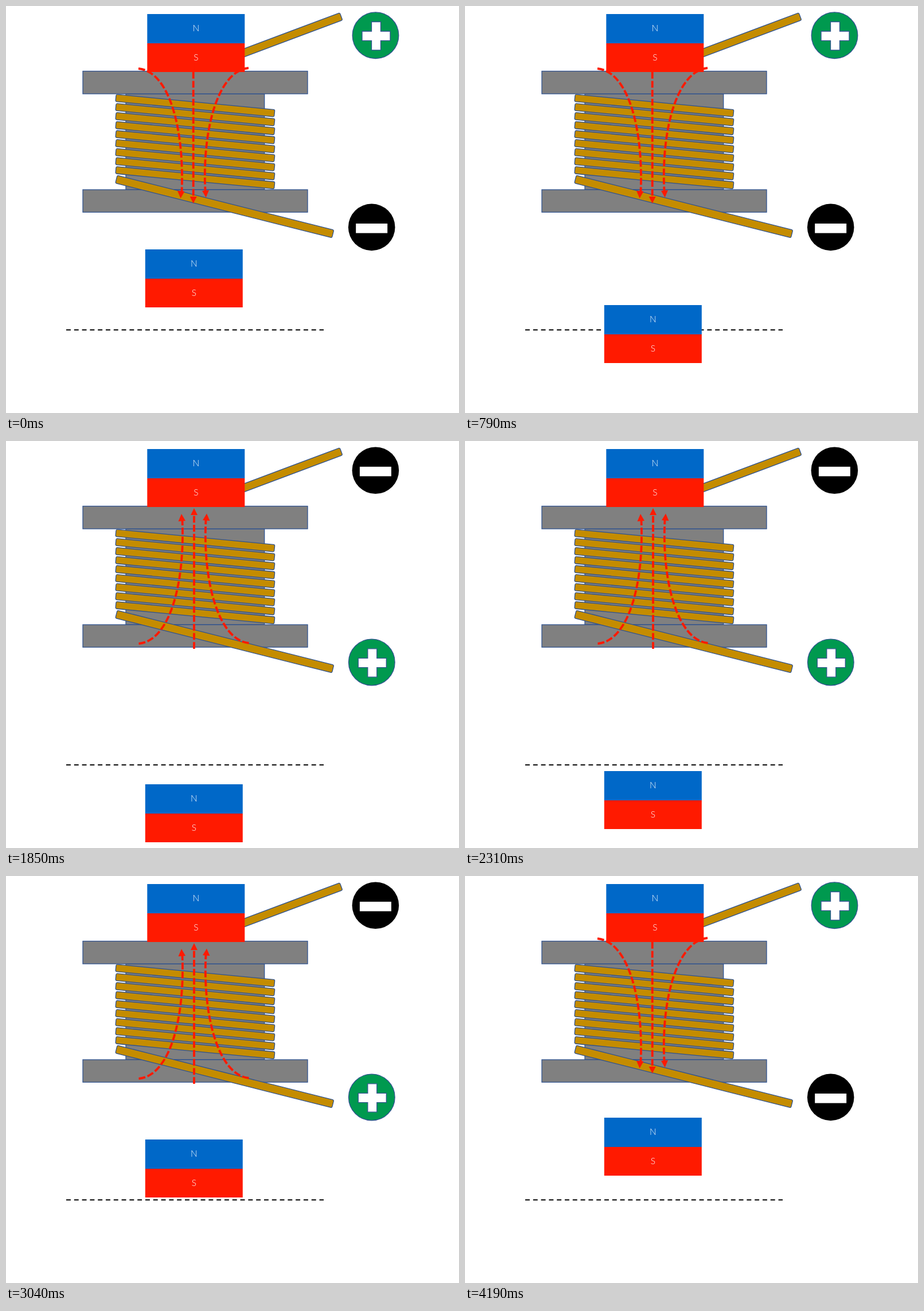
These frames come from a looping animation (790 by 709 pixels, 4220 ms). An HTML page:

```html
<!DOCTYPE html>
<html lang="en">
<head>
<meta charset="utf-8">
<title>Electromagnet and moving magnet</title>
<style>
  html, body { margin: 0; width: 100%; height: 100%; overflow: hidden; background: #fff; }
  svg { display: block; }
  text { font: 300 15.5px Lato, "Open Sans", sans-serif; fill: #fff; text-anchor: middle; }
  .edge { stroke: #2f528f; stroke-width: 1.3; }
  .iron { fill: #808080; }
  .wire { fill: #c48c00; }
  .field path { fill: none; stroke: #ff1a00; stroke-width: 3.9; stroke-dasharray: 11.8 3.9; }
  .field polygon { fill: #ff1a00; }
</style>
</head>
<body>
<svg width="790" height="709" viewBox="0 0 790 709">
  <defs>
    <g id="magnet">
      <rect width="170" height="51" fill="#0068c8"/>
      <rect y="51" width="170" height="50" fill="#ff1a00"/>
      <text x="85" y="30">N</text>
      <text x="85" y="81">S</text>
    </g>
    <g id="plus">
      <circle r="40.3" fill="#00994f" class="edge"/>
      <path d="M-7 -23.7h16v16.5h16.5v16.4h-16.5v16.5h-16v-16.5h-16.5v-16.4h16.5z" fill="#fff" class="edge"/>
    </g>
    <g id="minus">
      <circle r="40.8"/>
      <rect x="-27.5" y="-6.4" width="55" height="16.6" fill="#fff"/>
    </g>
  </defs>

  <g class="edge iron">
    <rect x="209" y="153" width="241.7" height="167"/>
    <rect x="134" y="113.5" width="392" height="39.5"/>
    <rect x="134" y="320" width="392" height="39.2"/>
  </g>
  <g id="coil" class="edge wire"></g>
  <use href="#magnet" x="246.3" y="14"/>

  <g id="down">
    <g class="field">
      <path d="M231 109C285 114 311 215 306.5 323"/>
      <path d="M326.7 99V333"/>
      <path d="M423 108C370 113 342 215 347.5 322"/>
      <polygon points="299,322 311.5,323 304.5,335"/>
      <polygon points="320.7,332 332.7,332 326.7,344"/>
      <polygon points="342,322 354,321 348.7,333.5"/>
    </g>
    <use href="#plus" x="644.5" y="51.2"/>
    <use href="#minus" x="637.7" y="385.4"/>
  </g>
  <g id="up">
    <g class="field">
      <path d="M231.5 353C286 348 312 247 307.5 139"/>
      <path d="M328 362V128"/>
      <path d="M423.5 352C371 347 343 245 348.5 138"/>
      <polygon points="300.5,140 313,139 306,127"/>
      <polygon points="322,129 334,129 328,117"/>
      <polygon points="343,138 355.5,139 350,126.5"/>
    </g>
    <use href="#minus" x="644.4" y="51.2"/>
    <use href="#plus" x="637.8" y="385.5"/>
  </g>

  <path d="M105 564.2H554" stroke="#000" stroke-width="2" stroke-dasharray="7.9 5.9"/>
  <use id="mover" href="#magnet" x="242.8"/>
</svg>
<script>
  const LOOP = 4220, TRAVEL = 1760, TOP = 421, BOTTOM = 598;
  const FALL_START = -148, RISE_START = 1858;
  const FLIP = 1270, FLIP_BACK = 3270;
  const el = id => document.getElementById(id);

  const bar = (x, y, length, width, angle) =>
    `<rect y="${-width / 2}" width="${length}" height="${width}" rx="2.3"
      transform="translate(${x} ${y}) rotate(${angle})"/>`;

  let bars = bar(584.5, 18.2, 230, 13.6, 159.5);
  for (let i = 0; i < 9; i++) bars += bar(191.5, 160.2 + i * 15.7, 278, 12.5, 5.5);
  el("coil").innerHTML = bars + bar(192.4, 301.8, 389.5, 14, 14.15);

  // Constant acceleration to the midpoint, then constant braking
  function ease(u) {
    u = Math.min(1, Math.max(0, u));
    return u < .5 ? 2 * u * u : 1 - 2 * (1 - u) ** 2;
  }

  function draw(now) {
    const t = now % LOOP;
    const depth = ease((t - FALL_START) / TRAVEL) - ease((t - RISE_START) / TRAVEL);
    const flipped = t >= FLIP && t < FLIP_BACK;
    el("mover").setAttribute("y", Math.round(TOP + (BOTTOM - TOP) * depth));
    el("up").style.display = flipped ? "" : "none";
    el("down").style.display = flipped ? "none" : "";
  }

  const start = performance.now();
  function tick() {
    draw(performance.now() - start);
    requestAnimationFrame(tick);
  }
  tick();
</script>
</body>
</html>
```
